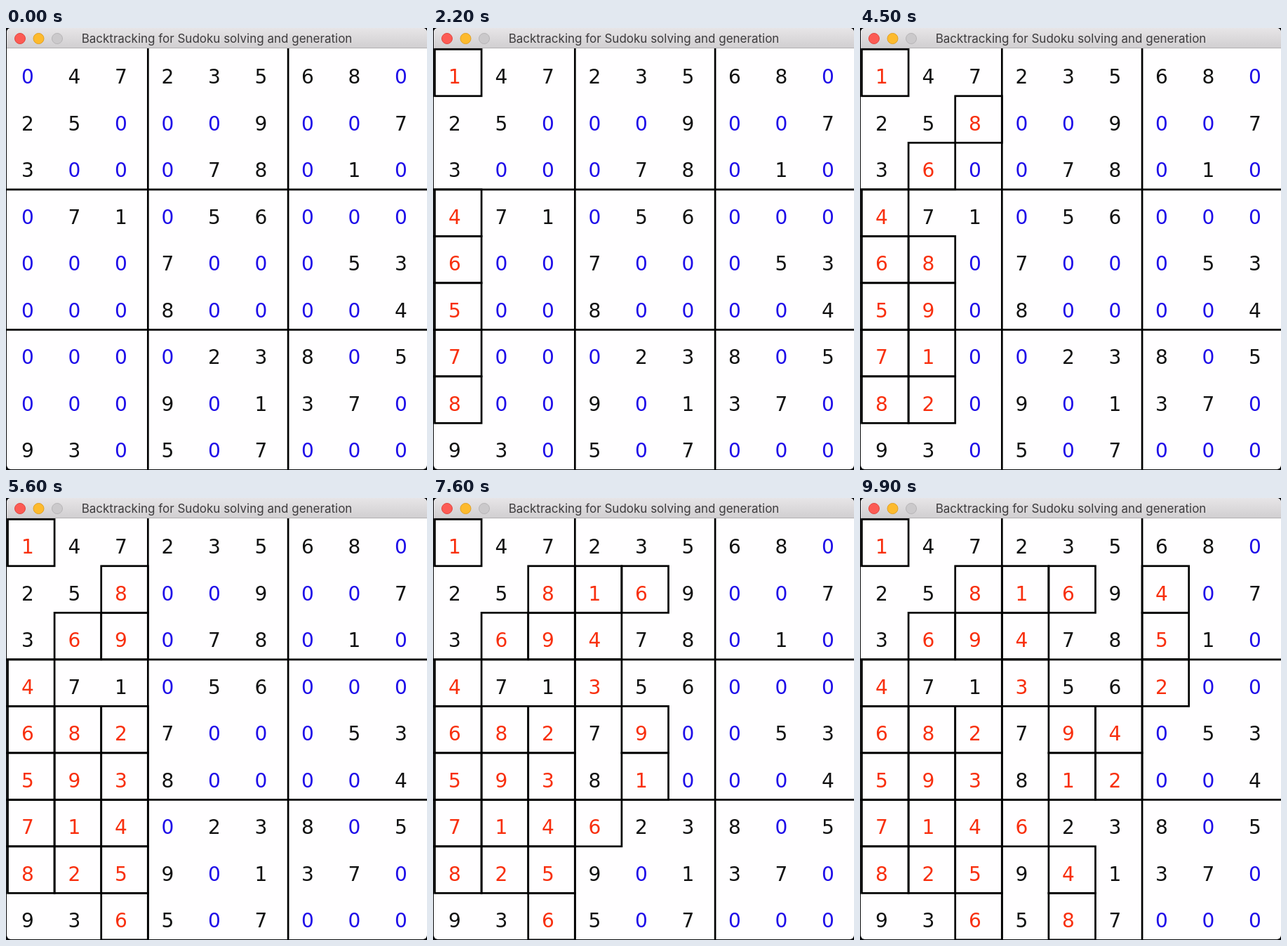
An HTML page that plays this animation: 600 by 629 pixels, repeating every 10 s.

```html
<!DOCTYPE html>
<html lang="en">
<head>
<meta charset="utf-8">
<title>Backtracking for Sudoku solving and generation</title>
<style>
  html, body { margin: 0; width: 100%; height: 100%; overflow: hidden; background: #08090c; }
  svg { display: block; width: 600px; height: 629px; }
  .title { font: 17px Inter, Roboto, sans-serif; fill: #3d3b3d; text-anchor: middle; }
  .digit { font: 28px "DejaVu Sans", sans-serif; text-anchor: middle; }
  .given { fill: #111; }
  .empty { fill: #1e0ce8; }
  .tried { fill: #f82f0e; }
  .line, .box { fill: none; stroke: #000; stroke-width: 2.7; }
</style>
</head>
<body>
<svg viewBox="0 0 600 629">
  <defs>
    <linearGradient id="bar" x2="0" y2="1">
      <stop offset="0" stop-color="#e7e5e7"/>
      <stop offset="1" stop-color="#d0ced0"/>
    </linearGradient>
    <clipPath id="frame"><rect x="1" y="0" width="599" height="628" rx="6"/></clipPath>
  </defs>
  <g clip-path="url(#frame)">
    <rect width="600" height="629" fill="#fffeff"/>
    <g id="board"></g>
    <rect width="600" height="29" fill="url(#bar)"/>
    <rect y="28" width="600" height="1" fill="#b3b1b3"/>
    <g stroke-width="1">
      <circle cx="20" cy="15" r="7.5" fill="#fc5b54" stroke="#e2463f"/>
      <circle cx="46.5" cy="15" r="7.5" fill="#fdba2d" stroke="#e0a023"/>
      <circle cx="73" cy="15" r="7.5" fill="#cbc9cb" stroke="#b7b5b7"/>
    </g>
    <text class="title" x="300.5" y="21">Backtracking for Sudoku solving and generation</text>
  </g>
</svg>
<script>
const PUZZLE = [
  '047235680', '250009007', '300078010',
  '071056000', '000700053', '000800004',
  '000023805', '000901370', '930507000'
].map(row => [...row].map(Number));

const LOOP = 10000, START = 1000, STEP = 200;
const STEPS = (LOOP - START) / STEP;
const lineX = i => 2.5 + 66.6 * i;
const lineY = i => 30.3 + 66.5 * i;

function fits(grid, r, c, n) {
  const top = r - r % 3, left = c - c % 3;
  for (let i = 0; i < 9; i++) {
    if (grid[r][i] === n || grid[i][c] === n) return false;
    if (grid[top + Math.floor(i / 3)][left + i % 3] === n) return false;
  }
  return true;
}

// Column by column; yields the grid after every placed digit.
function* solve(grid, k = 0) {
  while (k < 81 && grid[k % 9][Math.floor(k / 9)]) k++;
  if (k === 81) return true;
  const r = k % 9, c = Math.floor(k / 9);
  for (let n = 1; n <= 9; n++) {
    if (!fits(grid, r, c, n)) continue;
    grid[r][c] = n;
    yield grid.map(row => [...row]);
    if (yield* solve(grid, k + 1)) return true;
    grid[r][c] = 0;
  }
  return false;
}

const states = [PUZZLE];
for (const state of solve(PUZZLE.map(row => [...row]))) {
  states.push(state);
  if (states.length >= STEPS) break;
}

const board = document.getElementById('board');
function add(tag, attrs) {
  const el = document.createElementNS('http://www.w3.org/2000/svg', tag);
  for (const name in attrs) el.setAttribute(name, attrs[name]);
  return board.appendChild(el);
}

const cells = [];
for (let r = 0; r < 9; r++) {
  for (let c = 0; c < 9; c++) {
    cells.push({
      r, c,
      box: add('rect', { class: 'box', x: lineX(c), y: lineY(r), width: 66.6, height: 66.5 }),
      text: add('text', { x: 31 + 66.5 * c, y: 79 + 66.5 * r })
    });
  }
}
for (const i of [3, 6]) {
  add('path', { class: 'line', d: `M${lineX(i)} 29V629M0 ${lineY(i)}H600` });
}

let shown = -1;
function draw(step) {
  if (step === shown) return;
  shown = step;
  for (const { r, c, box, text } of cells) {
    const n = states[step][r][c];
    const kind = PUZZLE[r][c] ? 'given' : n ? 'tried' : 'empty';
    text.textContent = n;
    text.setAttribute('class', 'digit ' + kind);
    box.style.display = kind === 'tried' ? '' : 'none';
  }
}

const t0 = performance.now();
function tick() {
  const t = (performance.now() - t0) % LOOP;
  const step = Math.floor((t - START) / STEP);
  draw(Math.max(0, Math.min(states.length - 1, step)));
  requestAnimationFrame(tick);
}
tick();
</script>
</body>
</html>
```
